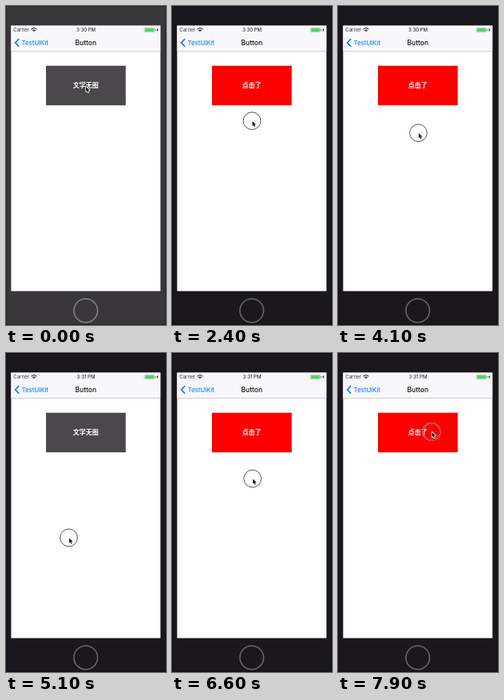
Animation, 200 px wide and 399 px high, one loop 8000 ms. Source, as an HTML page:

```html
<!DOCTYPE html>
<html lang="zh">
<head>
<meta charset="utf-8">
<title>Button</title>
<style>
  html, body { margin: 0; width: 100%; height: 100%; overflow: hidden; background: #1a181c; }
  svg { display: block; width: 200px; height: 399px; }
  text { font-family: Inter, Roboto, sans-serif; }
  .status { font-size: 6px; fill: #333; }
  .label { font: 700 8px "Noto Sans CJK SC", "Noto Sans CJK", "Noto Sans CJK JP", sans-serif; fill: #fff; }
  .mid { text-anchor: middle; }
  .line { fill: none; }
</style>
</head>
<body>
<svg viewBox="0 0 200 399">
  <rect id="bezel" width="200" height="399"/>
  <rect class="line" x=".5" y=".5" width="199" height="398" stroke="#000" stroke-opacity=".35"/>
  <circle id="home" class="line" cx="99.7" cy="381" r="14.8" stroke-width="1.5"/>

  <rect x="6.4" y="24.6" width="186.7" height="332" fill="#fffeff"/>
  <rect x="6.4" y="24.6" width="186.7" height="31.4" fill="#f8f7f9"/>
  <rect x="6.4" y="56" width="186.7" height="1" fill="#cfced1"/>

  <text class="status" x="9.3" y="32.2">Carrier</text>
  <g class="line" stroke="#111">
    <path d="M31.6 29.2Q35 26 38.4 29.2M33 30.7Q35 28.9 37 30.7"/>
    <path d="M34.4 32L35 31.3L35.6 32"/>
  </g>
  <text id="clock" class="status mid" x="100" y="32.2" font-weight="500"></text>
  <rect x="173" y="27.3" width="12.6" height="5.4" rx="1" fill="#fff" stroke="#8c8c8c" stroke-width=".5"/>
  <rect x="173.7" y="28" width="11.2" height="4" rx=".4" fill="#4cd964"/>
  <rect x="186.1" y="29" width=".8" height="2" fill="#777"/>
  <path d="M189.6 27.4L187.8 30.3H189L188.6 32.7L190.5 29.6H189.3Z" fill="#222"/>

  <path class="line" d="M16.2 41L11.6 45.9L16.2 50.8" stroke="#007aff" stroke-width="1.6"/>
  <text x="19.6" y="48.9" font-size="8.2" letter-spacing="-.2" fill="#007aff">TestUIKit</text>
  <text class="mid" x="99.8" y="48.9" font-size="8.5" font-weight="500" fill="#111">Button</text>

  <rect id="button" x="50" y="74.8" width="99.7" height="49.5" rx=".5"/>
  <text id="label" class="label mid" x="99.8" y="102"></text>

  <g id="pointer">
    <g id="ring" class="line">
      <circle r="10.9" stroke="#fff" stroke-opacity=".55" stroke-width="1.7"/>
      <circle r="10.9" stroke="#2a2a2a" stroke-width=".8"/>
    </g>
    <path d="M.5 .4V6.6L1.9 5.4L2.9 7.7L4 7.2L3 4.9H5Z"
      fill="#111" stroke="#fff" stroke-width="1.5" stroke-linejoin="round" paint-order="stroke"/>
  </g>
</svg>
<script>
  const LOOP = 8000, STEP = 100;
  const ACTIVE = 300, PRESS = 400, MINUTE = 4400;
  const DRAG_LIMIT = 161; // below this the press is released

  // Each drag leaves the previous spot and rests at (x, y) until the next one.
  const home = { x: 99.5, y: 100.5 };
  const drags = [
    { from: 950, to: 3150, x: 100.3, y: 166 },
    { from: 3150, to: 3600, x: 100.5, y: 155.5 },
    { from: 4000, to: 4700, x: 100, y: 178 },
    { from: 4800, to: 5100, x: 78.5, y: 231 },
    { from: 5100, to: 6050, x: 100.5, y: 153.5 },
    { from: 6500, to: 6900, x: 101, y: 168 },
    { from: 6900, to: 7900, x: 117, y: 98.5 }
  ];

  const $ = id => document.getElementById(id);
  const attr = (id, name, value) => $(id).setAttribute(name, value);
  const clamp = k => Math.min(1, Math.max(0, k));

  function position(t) {
    return drags.reduce((p, d) => {
      const k = clamp((t - d.from) / (d.to - d.from));
      return { x: p.x + (d.x - p.x) * k, y: p.y + (d.y - p.y) * k };
    }, home);
  }

  function draw(t) {
    const { x, y } = position(t);
    const active = t >= ACTIVE;
    const pressed = t >= PRESS && y < DRAG_LIMIT;

    attr('bezel', 'fill', active ? '#1a181c' : '#39373a');
    attr('home', 'stroke', active ? '#69686a' : '#858487');
    attr('button', 'fill', pressed ? '#f00' : '#4a484b');
    attr('ring', 'visibility', active ? 'visible' : 'hidden');
    attr('pointer', 'transform', `translate(${x} ${y})`);
    $('label').textContent = pressed ? '点击了' : '文字无图';
    $('clock').textContent = t < MINUTE ? '3:30 PM' : '3:31 PM';
  }

  const start = performance.now();
  function tick() {
    const t = (performance.now() - start) % LOOP;
    draw(Math.floor(t / STEP) * STEP);
    requestAnimationFrame(tick);
  }
  tick();
</script>
</body>
</html>
```
